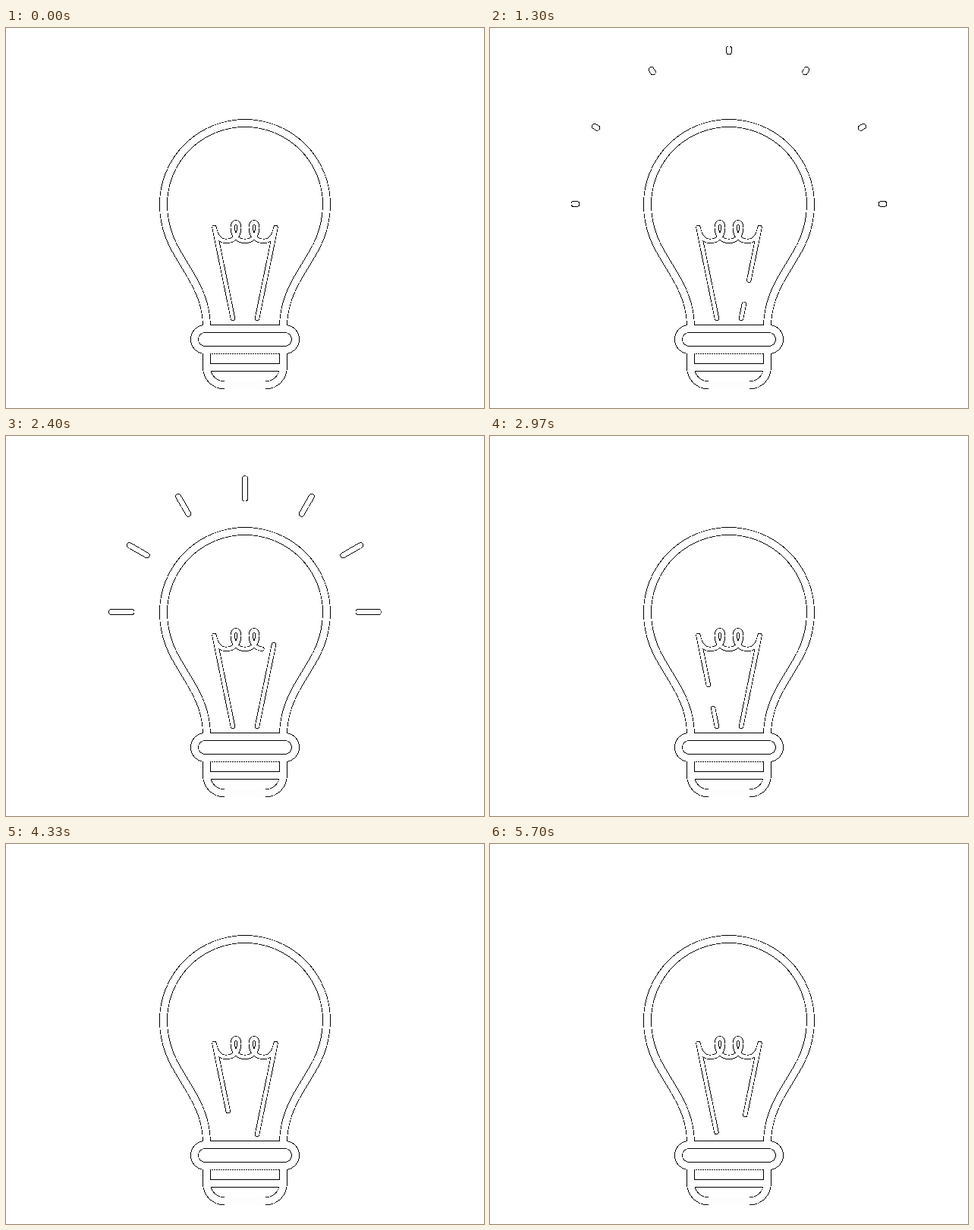
An HTML page for the animation above (5730 ms loop, 630 by 501 pixels).

```html
<!DOCTYPE html>
<html lang="en">
<head>
<meta charset="utf-8">
<title>Light bulb</title>
<style>
  html, body { margin: 0; width: 100%; height: 100%; overflow: hidden; background: #fff; }
  svg { display: block; width: 630px; height: 501px; shape-rendering: crispEdges; }
  path, rect { fill: none; }
  .outline { --edge: 0.85px; stroke: #000; }
  .body { --edge: -0.85px; stroke: #fdfdfd; }
  .glass { stroke-width: calc(10px + var(--edge)); }
  .wire { stroke-width: calc(5.6px + var(--edge)); stroke-linecap: round; stroke-linejoin: round; }
  .rays { stroke-width: calc(7px + var(--edge)); stroke-linecap: round; }
  .dots { stroke: #fff; stroke-dasharray: 1 2; }
</style>
</head>
<body>
<svg viewBox="0 0 630 501">
  <defs>
    <g id="bulb">
      <g class="glass">
        <path d="M264.5 396V391C263.5 365 255 345 241 322L226 297C214 277 207.5 256 207.5 232.5
                 A107.5 107 0 0 1 422.5 232.5C422.5 256 416 277 404 297L389 322C375 345 366.5 365 365.5 391V396"/>
        <rect x="248.5" y="396.5" width="133" height="28" rx="14"/>
        <path d="M264.5 425V446C264.5 461 274.5 471 289 471H341C355.5 471 365.5 461 365.5 446V425"/>
        <path d="M264.5 447.5H365.5"/>
      </g>
      <path id="wire" class="wire" pathLength="432"
        d="M299 383L274.5 263C277 275 283 281 290 281C300 281 307.2 274 307.2 263C307.2 254 298.8 254 298.8 263
           C298.8 274 306 281 315 281C324 281 331.2 274 331.2 263C331.2 254 322.8 254 322.8 263
           C322.8 274 330 281 340 281C347 281 353 275 355.5 263L331 383"/>
      <path id="rays" class="rays"/>
    </g>
  </defs>
  <use class="outline" href="#bulb"/>
  <use class="body" href="#bulb"/>
  <path class="dots" d="M270 429.5H360"/>
</svg>
<script>
  const LOOP = 5730, CYCLE = 18, WIRE = 432;
  const wire = document.getElementById('wire');
  const rays = document.getElementById('rays');

  // The gap running along the filament: [phase, start, end]
  const GAP = [[0, 0, 31], [1, 24, 55], [5, 132, 174], [7, 172, 212],
               [10, 239, 280], [11, 260, 302], [17, 406, 435], [18, 432, 463]];

  // Phases of each dash: tip leaves, tip arrives, tail leaves, tail arrives
  const DASHES = [[5.2, 7.9, 6.1, 11.05], [7.95, 15.3, 11.3, 16.3]];
  const NEAR = 140.5, FAR = 204.5;

  const radius = (p, from, to) =>
    NEAR + (FAR - NEAR) * Math.min(1, Math.max(0, (p - from) / (to - from)));

  function gapAt(p) {
    const i = GAP.findIndex(k => k[0] > p);
    const a = GAP[i - 1], b = GAP[i];
    const u = (p - a[0]) / (b[0] - a[0]);
    return [1, 2].map(k => a[k] + (b[k] - a[k]) * u);
  }

  function rayPath(p) {
    let d = '';
    for (const [tip0, tip1, tail0, tail1] of DASHES) {
      const tip = radius(p, tip0, tip1), tail = radius(p, tail0, tail1);
      if (tip - tail < 0.1) continue;
      for (let i = 0; i < 7; i++) {
        const c = Math.cos(i * Math.PI / 6), s = Math.sin(i * Math.PI / 6);
        const at = r => `${(315 + r * c).toFixed(2)} ${(232 - r * s).toFixed(2)}`;
        d += `M${at(tail)}L${at(tip)}`;
      }
    }
    return d;
  }

  function draw(step) {
    const p = step % CYCLE;
    if (step === 0) {
      wire.setAttribute('stroke-dasharray', 'none');
    } else {
      const [start, end] = gapAt(p);
      wire.setAttribute('stroke-dasharray', `${WIRE - end + start} ${end - start}`);
      wire.setAttribute('stroke-dashoffset', -end);
    }
    rays.setAttribute('d', rayPath(p));
  }

  // 12.5 steps a second, shown on a 30 Hz clock
  let shown = -1;
  function tick() {
    const t = performance.now() % LOOP;
    const step = Math.min(71, Math.floor(Math.floor((t + 4) * 0.03) / 2.4 + 1e-6));
    if (step !== shown) draw(shown = step);
    requestAnimationFrame(tick);
  }
  tick();
</script>
</body>
</html>
```
